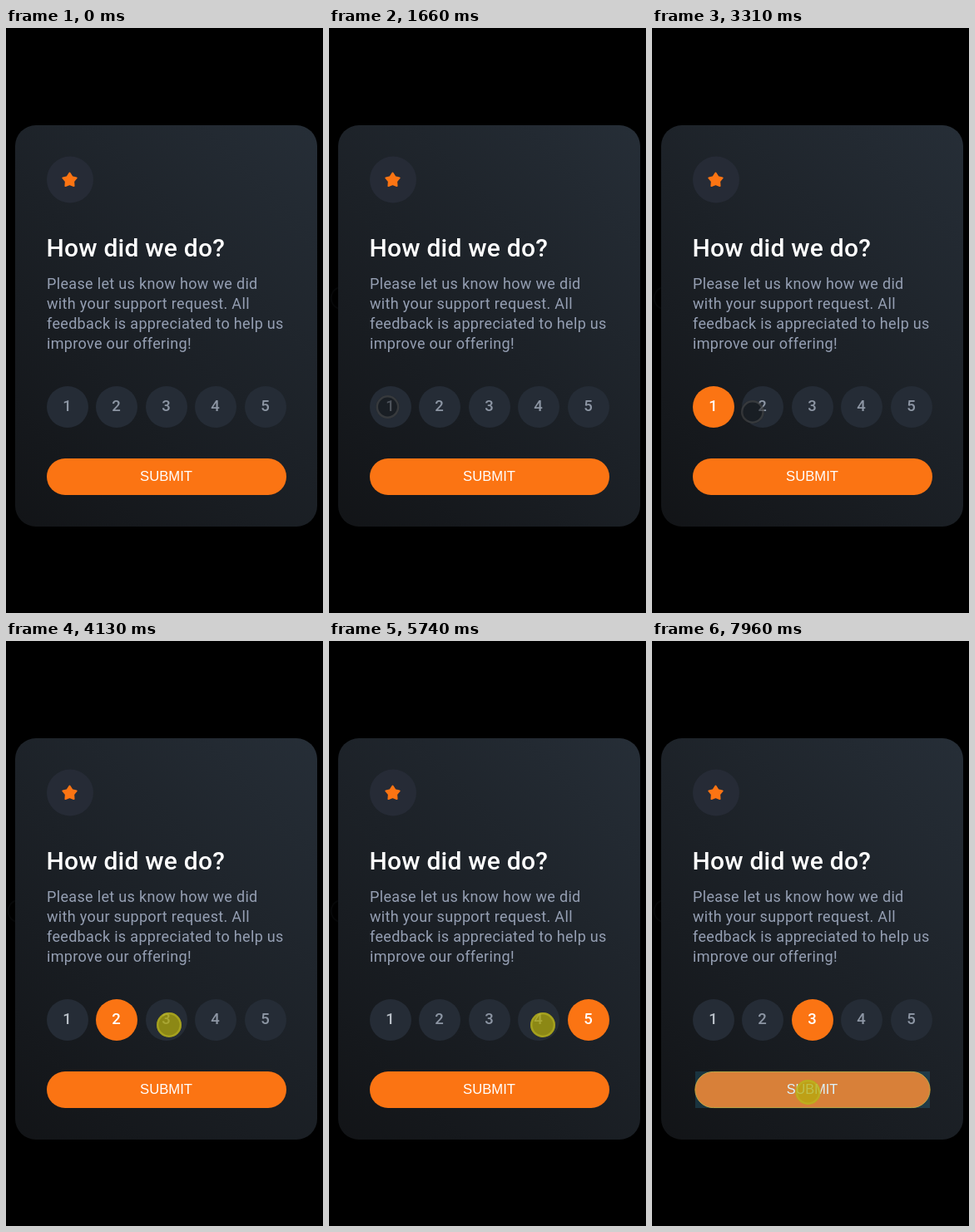
These frames come from a looping animation (381x704 px, 8 s). An HTML page:

```html
<!DOCTYPE html>
<html lang="en">
<head>
<meta charset="utf-8">
<title>Rating card</title>
<style>
  html, body { margin: 0; width: 100%; height: 100%; overflow: hidden; background: #000; }
  svg { display: block; width: 381px; height: 704px; }
  text { font-family: Roboto, "Open Sans", sans-serif; }
  .title { font-size: 30px; font-weight: 500; letter-spacing: .2px; fill: #fff; }
  .copy { font-size: 18px; letter-spacing: .33px; fill: #959fb3; }
  .digit { font-size: 18.5px; font-weight: 500; text-anchor: middle; }
  .label { font-family: "Liberation Sans", Arial, sans-serif; font-size: 16.67px; text-anchor: middle; fill: #fff; }
</style>
</head>
<body>
<svg viewBox="0 0 381 704">
  <defs>
    <linearGradient id="shade" gradientUnits="userSpaceOnUse" x1="-19" y1="570" x2="404" y2="147">
      <stop offset="0" stop-color="#121417"/>
      <stop offset="1" stop-color="#262e37"/>
    </linearGradient>
  </defs>
  <rect width="381" height="704"/>
  <path id="trace" d="M11 312.5A13.5 13.5 0 0 0 11 337.5" fill="none" stroke="#060708" stroke-width="2"/>
  <rect x="11" y="117" width="363" height="483" rx="25" fill="url(#shade)"/>
  <circle cx="77" cy="182.5" r="28" fill="#262b36"/>
  <polygon id="star" fill="#fb7413" stroke="#fb7413" stroke-width="2" stroke-linejoin="round"/>
  <text class="title" x="48.5" y="274.7">How did we do?</text>
  <g id="copy"></g>
  <g id="marks"></g>
  <g id="button">
    <rect id="pill" x="49" y="518" width="288" height="44" rx="22" fill="#fb7413"/>
    <text class="label" x="192.5" y="545">SUBMIT</text>
  </g>
  <rect id="flash" x="52" y="518" width="282" height="44" fill="#33b5e5"/>
  <g id="touch">
    <circle id="disc"/>
    <circle id="ring" fill="none" stroke-width="2.5"/>
  </g>
</svg>
<script>
const LOOP = 8000, HOLD = 70, MOVE = 200;
const SUBMIT_TOUCH = 7360, PRESS = 7560, FADE = 7960;
const $ = id => document.getElementById(id);

function set(el, attrs) {
  for (const k in attrs) el.setAttribute(k, attrs[k]);
}

function add(parent, tag, attrs, text) {
  const el = document.createElementNS("http://www.w3.org/2000/svg", tag);
  set(el, attrs);
  if (text) el.textContent = text;
  parent.appendChild(el);
  return el;
}

// each tap: touch time, rating, pointer x
const taps = [
  [3050, 1, 75], [3580, 2, 123], [4130, 3, 196], [4600, 4, 255],
  [5070, 5, 322], [5740, 4, 257], [6330, 3, 196]
].map(([at, n, x]) => ({ at, n, x, up: at + HOLD }));

// pointer path: time, x, y; between taps it waits, then moves on
const path = [
  [260, 340, 700], [500, 361, 440], [800, 150, 223], [1130, 17, 325],
  [1660, 70, 456], [1910, 191, 460], [2180, 274, 462], [2270, 274, 462],
  ...taps.flatMap(({ x, up }, i) => [
    [i ? taps[i - 1].up + MOVE : 2850, x, 462],
    [up, x, 462]
  ]),
  [6690, 193, 529], [6960, 187.5, 543]
];

["Please let us know how we did", "with your support request. All",
 "feedback is appreciated to help us", "improve our offering!"]
  .forEach((s, i) => add($("copy"), "text", { class: "copy", x: 49, y: 314 + 24 * i }, s));

const marks = [1, 2, 3, 4, 5].map(n => {
  const cx = Math.floor(74 + 59.5 * (n - 1));
  return {
    n,
    dot: add($("marks"), "circle", { cx, cy: 456, r: 25 }),
    num: add($("marks"), "text", { class: "digit", x: cx - 0.5, y: 461 }, String(n))
  };
});

set($("star"), {
  points: Array.from({ length: 10 }, (_, i) => {
    const a = i * Math.PI / 5, r = i % 2 ? 4.9 : 8.6;
    return (76.5 + r * Math.sin(a)).toFixed(2) + "," + (183.1 - r * Math.cos(a)).toFixed(2);
  }).join(" ")
});

function pointAt(t) {
  const i = path.findIndex(p => p[0] > t);
  if (i < 1) return path.at(i).slice(1);
  const a = path[i - 1], b = path[i], k = (t - a[0]) / (b[0] - a[0]);
  return [a[1] + (b[1] - a[1]) * k, a[2] + (b[2] - a[2]) * k];
}

const visible = on => ({ visibility: on ? "visible" : "hidden" });

function draw(t) {
  const picked = taps.reduce((v, tap) => t >= tap.up ? tap.n : v, 0);
  for (const { n, dot, num } of marks) {
    const on = n === picked;
    set(dot, { fill: on ? "#fb7413" : "#252c36" });
    set(num, { fill: on ? "#fff" : n === 1 && picked ? "#b9c0c8" : "#8d96a4" });
  }

  const [x, y] = pointAt(t);
  const down = t >= SUBMIT_TOUCH || taps.some(tap => t >= tap.at && t < tap.up);
  const r = down ? 15 : 14;
  set($("touch"), { transform: `translate(${x} ${y})`, ...visible(t >= 260) });
  set($("disc"), { r, fill: down ? "rgba(180,172,8,.72)" : "rgba(13,15,18,.5)" });
  set($("ring"), { r: r - 1.3, stroke: down ? "rgba(190,185,40,.5)" : "rgba(100,100,100,.4)" });
  set($("trace"), visible(t >= 1130));

  const pressed = t >= PRESS, fading = t >= FADE;
  set($("button"), { transform: pressed ? "translate(193 540) scale(.98) translate(-193 -540)" : "" });
  set($("pill"), { stroke: fading ? "#d9a526" : "none" });
  set($("flash"), { opacity: fading ? 0.175 : pressed ? 0.4 : 0 });
}

const start = performance.now();
function frame() {
  draw((performance.now() - start) % LOOP);
  requestAnimationFrame(frame);
}
draw(0);
requestAnimationFrame(frame);
</script>
</body>
</html>
```
